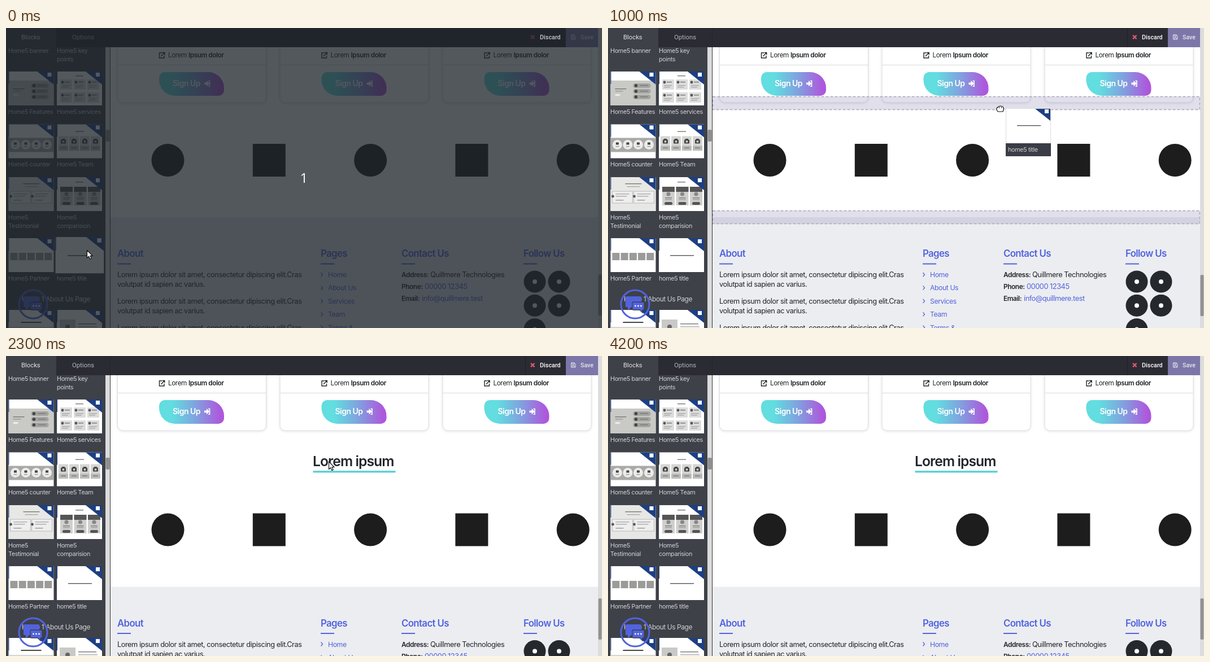
Animation of 1055 by 531 pixels, one loop 4.5 s. Source, as an HTML page:

```html
<!DOCTYPE html>
<html lang="en">
<head>
<meta charset="utf-8">
<title>Website builder: dragging a title block</title>
<style>
  html, body { margin: 0; width: 100%; height: 100%; overflow: hidden; background: #fff; }
  svg { display: block; width: 1055px; height: 531px; }
  text { font-family: Inter, "Open Sans", sans-serif; letter-spacing: -.037em; white-space: pre; }
  .ui { font-family: Roboto, sans-serif; letter-spacing: 0; }
</style>
</head>
<body>
<svg id="stage" viewBox="0 0 1055 531"></svg>
<script>
const INK = '#212529', BLUE = '#5163df', NAVY = '#1d3f82', SIDE = '#3e4148', LABEL = '#cfd0d3';
const BODY = 12.8, SMALL = 10.9;

const rect = (x, y, w, h, fill, extra = '') =>
  `<rect x="${x}" y="${y}" width="${w}" height="${h}" fill="${fill}" ${extra}/>`;
const circle = (x, y, r, fill, extra = '') =>
  `<circle cx="${x}" cy="${y}" r="${r}" fill="${fill}" ${extra}/>`;
const path = (d, fill, extra = '') => `<path d="${d}" fill="${fill}" ${extra}/>`;
const line = (d, color, width = 1, extra = '') =>
  path(d, 'none', `stroke="${color}" stroke-width="${width}" ${extra}`);
const text = (x, y, size, str, fill = INK, extra = '') =>
  `<text x="${x}" y="${y}" font-size="${size}" fill="${fill}" ${extra}>${str}</text>`;
const group = (x, y, body, extra = '') => `<g transform="translate(${x} ${y})" ${extra}>${body}</g>`;
const each = (list, fn) => list.map(fn).join('');
const range = n => [...Array(n).keys()];
const semi = 'font-weight="600"';

// Page content
function card(x) {
  return group(x, 0,
    rect(.5, -20, 263, 152, '#fff', 'rx="9" stroke="#dadbe0" filter="url(#soft)"') +
    line('M1 65.5H263', '#dadbdd') +
    line('M79 44H74.5V53H83V49M77.5 50L83.5 43.7M79.5 43.5H83.7V47.5', INK, 1.4) +
    text(90, 52, 11.8, `Lorem <tspan ${semi}>Ipsum dolor</tspan>`) +
    path('M84 78H161A28 28 0 0 1 189 106V110A10 10 0 0 1 179 120H102A28 28 0 0 1 74 92V88A10 10 0 0 1 84 78Z', 'url(#candy)') +
    text(98, 103, 14, 'Sign Up', '#fff', semi) +
    path('M154 96.5H158V93L163.5 98.3 158 103.5V100.3H154Z', '#fff') +
    line('M161 93.5H163.5V103.2H161', '#fff', 1.6));
}

function footer() {
  const lorem = y =>
    text(197, y, BODY, 'Lorem ipsum dolor sit amet, consectetur dipiscing elit.Cras') +
    text(197, y + 17, BODY, 'volutpat id sapien ac varius.');
  const heads = [[197, 'About'], [557, 'Pages'], [700, 'Contact Us'], [916, 'Follow Us']];
  const links = ['Home', 'About Us', 'Services', 'Team', 'Terms &amp;'];
  const facts = [
    ['Address:', 751, 'Quillmere Technologies', INK],
    ['Phone:', 741, '00000 12345', BLUE],
    ['Email:', 736, 'info@quillmere.test', BLUE]];
  return rect(185, 335, 863, 300, '#ecedf0') +
    each(heads, ([x, s]) => text(x, 405, 16.8, s, BLUE, semi) + rect(x, 416.5, 24, 2, BLUE)) +
    each([441, 488, 535], lorem) +
    each(links, (s, i) => {
      const y = 441 + i * 23.4;
      return line(`M557.5 ${y - 8}l3 3.5-3 3.5`, BLUE, 1.3) + text(570, y, 12.3, s, BLUE);
    }) +
    each(facts, ([name, x, value, color], i) =>
      text(700, 441 + i * 21, 11.9, name, INK, semi) + text(x, 441 + i * 21, BODY, value, color)) +
    each(range(5), i => {
      const x = 936 + i % 2 * 43, y = 449 + (i >> 1) * 42.3;
      return circle(x, y, 19.5, '#25292d') + circle(x, y, 4, '#fff');
    });
}

const partners = each(range(5), i => {
  const x = 286.5 + i * 179.3;
  return i % 2 ? rect(x - 29, 205, 58, 58, '#1d1d1d') : circle(x, 234, 29, '#1d1d1d');
});

const zone = y => rect(185.5, y, 862, 23, '#7c78aa', 'fill-opacity="var(--pulse)"') +
  rect(185.5, y, 862, 23, 'none', 'stroke="#aaa8b8" stroke-width="1.4" stroke-dasharray="5 3"');

// Sidebar thumbnails, each 80 by 60
const stripe = (x, y, w, c = '#777') => rect(x, y, w, 1.4, c);
const thumbs = {
  features: rect(0, 16, 80, 44, '#c9c9c5') + stripe(8, 30, 20) + stripe(8, 34, 14, '#999') +
    rect(8, 40, 9, 3, '#eee', 'rx="1.5"') +
    each([21, 31, 41], y => rect(40, y, 31, 8, '#a3a3a1', 'rx="4"') +
      circle(45, y + 4, 2.8, '#444') + stripe(52, y + 3, 14)),
  services: stripe(33, 7, 14) + each(range(6), i => {
    const x = 6 + i % 3 * 24, y = 14 + (i / 3 | 0) * 23;
    return rect(x, y, 21, 18, '#dcdcdc') + circle(x + 4, y + 5, 2.4, '#555') +
      stripe(x + 8, y + 4, 9) + stripe(x + 3, y + 10, 14, '#aaa') + stripe(x + 3, y + 13, 11, '#aaa');
  }),
  counter: rect(0, 24, 80, 25, '#a9a9a7') + each([12, 30.5, 49, 68], x =>
    circle(x, 36, 8.5, '#ececea') + rect(x - 2.5, 32, 5, 4, '#444') + stripe(x - 3, 38.5, 6, '#999')),
  team: stripe(33, 12, 15) + each(range(4), i => {
    const x = 3 + i * 19;
    return rect(x, 21, 17, 26, '#d5d5d3') + rect(x, 38, 17, 8, '#b9b9b7') +
      rect(x + 4, 27, 9, 7, '#444', 'rx="1"') + rect(x + 6, 25.5, 5, 3, '#444') +
      circle(x + 8.5, 30.5, 2, '#ccc') + stripe(x + 4, 41, 9);
  }),
  testimonial: rect(0, 0, 80, 60, '#e7e7e5') + stripe(26, 11, 29) + stripe(29, 16, 23, '#aaa') +
    each([3, 41], x => rect(x, 25, 36, 21, '#eee', 'stroke="#bbb"') + circle(x + 1, 34, 2.4, '#555') +
      stripe(x + 6, 29, 24, '#aaa') + stripe(x + 6, 33, 20, '#aaa') + stripe(x + 6, 40, 14, '#999')),
  comparision: stripe(33, 8, 14) + each(range(3), i => {
    const x = 6 + i * 24.5;
    return rect(x, 17, 22, 33, '#cfcfcd') + rect(x, 17, 22, 9, '#555') + circle(x + 11, 30, 3.6, '#888') +
      stripe(x + 5, 36, 12) + stripe(x + 5, 39, 12, '#999') + rect(x + 4, 44, 14, 5, '#555', 'rx="2.5"');
  }),
  partner: each(range(5), i => rect(3 + i * 15.2, 26, 13, 13, '#9b9b99')),
  title: stripe(20, 30, 42, '#555'),
  banner: rect(0, 30, 80, 30, '#d5d5d3') + rect(22, 21, 36, 2, '#444'),
  story: rect(5, 17, 28, 40, '#c9c9c7') + circle(19, 30, 4, '#666') + stripe(38, 24, 32) +
    stripe(38, 29, 34, '#aaa'),
};
const thumb = kind => rect(0, 0, 80, 60, '#fff') + thumbs[kind] + rect(0, 0, 1, 22, NAVY) +
  path('M51 0H80V23Z', NAVY) + rect(69, 2, 7, 7, '#fff');

function sidebar() {
  const kinds = Object.keys(thumbs), tops = [77, 170.5, 264, 372, 499];
  const labels = [
    [4, 44, 'Home5 banner'], [90, 44, 'Home5 key'], [90, 59, 'points'],
    [4, 152, 'Home5 Features'], [90, 152, 'Home5 services'],
    [4, 245, 'Home5 counter'], [90, 245, 'Home5 Team'],
    [4, 339, 'Home5'], [4, 354, 'Testimonial'], [90, 339, 'Home5'], [90, 354, 'comparision'],
    [4, 447, 'Home5 Partner'], [90, 447, 'home5 title']];
  return rect(0, 34, 176, 497, SIDE) + rect(176, 34, 8, 497, '#dcdcdc') + rect(184, 34, 1, 497, '#333') +
    rect(176.5, 180, 7, 21, '#8e8e8e', 'rx="2"') +
    each(kinds, (kind, i) => group(i % 2 ? 90 : 4.5, tops[i >> 1], thumb(kind), `id="${kind}"`)) +
    each(labels, ([x, y, s]) => text(x, y, SMALL, s, LABEL)) +
    text(149, 484, 12, 'Home 1 About Us Page', LABEL, 'text-anchor="end"') +
    circle(48, 489, 25, 'none', `stroke="${BLUE}" stroke-width="3"`) +
    path('M33 475H57Q59 475 59 477V492Q59 494 57 494H41L35 500V494H33Q31 494 31 492V477Q31 475 33 475Z', BLUE) +
    path('M45 485H62Q64 485 64 487V497Q64 499 62 499H61V504L56 499H45Q43 499 43 497V487Q43 485 45 485Z',
      BLUE, `stroke="${SIDE}" stroke-width="1.3"`) +
    each([48.5, 53.5, 58.5], x => circle(x, 492, 1.4, '#fff'));
}

const header = rect(0, 0, 1048, 34, '#2b2b34') + rect(0, 0, 89, 34, SIDE) + rect(184, 0, 1, 34, '#24242c') +
  rect(919, 0, 1, 34, '#202028') + rect(991, 0, 57, 34, '#7c77a8') +
  text(27, 19.5, 11.3, 'Blocks', '#e4e4e6', 'class="ui"') +
  text(117, 19.5, 11.3, 'Options', '#b5b6bb', 'class="ui"') +
  line('M929 12.8l6.5 6.5m0-6.5l-6.5 6.5', '#d9566d', 2.4) +
  line('M1000.5 12H1006L1008 14V20H1000.5ZM1002.5 12V15H1005.5V12M1002.5 20V17H1006V20', '#e6e5ef') +
  text(1017, 19.5, 10.6, 'Save', '#e6e5ef', 'class="ui" font-weight="500"');

// Pointers
const outline = 'stroke="#111" stroke-width="1.2" stroke-linejoin="round"';
const pointers = {
  arrow: path('M.5 .5V14L3.6 11.2 5.8 16 8.2 15 6 10.2H10Z', '#fff', outline),
  open: path('M-4 7L-7 2Q-7-1-4 1L-5-4Q-4-6-2.5-4L-2-6Q-.5-8 1-6L2-6.5Q4-7 4-4L5-4Q7-4 6.5-1L5 7Z', '#fff', outline) +
    line('M-2.3-4L-1 0M1-6V-.5M4-4L3 0', '#111'),
  fist: path('M-4 5L-6 2V-1Q-5-3-4-2Q-3-5-1-4Q1-6 2.5-4Q5-5 5.5-2Q7-1 6 2L5 5Z', '#fff', outline) +
    line('M-1-3V-1M2.5-3V-1', '#111'),
};

const stage = document.getElementById('stage');
stage.innerHTML = `<defs>
    <linearGradient id="candy"><stop offset=".2" stop-color="#62dde0"/>
      <stop offset=".58" stop-color="#829fdf"/><stop offset=".95" stop-color="#ae57dc"/></linearGradient>
    <filter id="soft"><feDropShadow dx="0" dy="1" stdDeviation="2" flood-opacity=".12"/></filter>
  </defs>` +
  rect(0, 0, 1055, 531, '#fff') +
  each([197, 484.5, 772.5], card) +
  group(0, 0, partners + footer(), 'id="flow"') +
  group(0, 0, text(543, 194.5, 24.6, 'Lorem ipsum', INK, semi) + rect(543.5, 203, 146, 3.5, '#62d0d8'), 'id="added"') +
  group(0, 0, zone(121.5) + zone(323.5), 'id="zones"') +
  sidebar() + header +
  rect(1048, 0, 7, 531, '#dcdcdc') + rect(1048.5, 436, 6, 73, '#929292', 'id="scroll" rx="2"') +
  group(0, 0, thumb('title') + rect(0, 60, 80, 3, '#fff') + rect(.5, .5, 79, 62, 'none', 'stroke="#ddd"') +
    rect(0, 62, 80, 23, '#3a3d45') + text(4, 77, SMALL, 'home5 title', LABEL), 'id="dragged"') +
  group(0, 0, rect(0, 0, 1055, 531, '#1e242b', 'opacity=".76"') +
    text(527, 274, 24, '1', '#fff', 'text-anchor="middle" style="font-family:\'Open Sans\',sans-serif"'), 'id="veil"') +
  text(945, 19.5, 10.8, 'Discard', '#fff', 'class="ui" font-weight="500" id="discard"') +
  each(Object.keys(pointers), k => group(0, 0, pointers[k], `id="${k}"`));

// Keys: [time, x, y]
const pointerKeys = [
  [0, 143, 393], [299, 143, 393], [300, 147, 399], [400, 147, 399], [500, 215, 350], [700, 470, 215],
  [1000, 694, 143], [1500, 588, 136], [1600, 588, 134], [2000, 588, 134], [2200, 621, 178],
  [2400, 521, 195], [2600, 521, 195], [3000, 672, 187], [3200, 672, 187], [3500, 380, 300],
  [3800, 122, 333], [3900, 122, 333], [4100, 41, 7]];
const dragKeys = [[500, 212, 350], [700, 474, 214], [1000, 704, 142], [1500, 584.5, 135]];

function along(keys, t) {
  const i = keys.findIndex(k => k[0] > t);
  if (i < 0) return keys.at(-1).slice(1);
  if (i === 0) return keys[0].slice(1);
  const [a, b] = [keys[i - 1], keys[i]], p = (t - a[0]) / (b[0] - a[0]);
  return [a[1] + (b[1] - a[1]) * p, a[2] + (b[2] - a[2]) * p];
}

const el = id => document.getElementById(id);
const show = (id, on) => el(id).style.display = on ? '' : 'none';
const move = (id, x, y, scale = 1) =>
  el(id).setAttribute('transform', `translate(${x} ${y}) scale(${scale})`);

function draw(now) {
  const t = Math.floor(now % 4500 / 100) * 100;
  const dragging = t >= 500 && t < 1600, dropped = t >= 1600;
  show('veil', t < 300);
  el('discard').setAttribute('opacity', t < 300 ? .75 : 1);
  show('zones', dragging);
  stage.style.setProperty('--pulse', .24 + .09 * Math.sin(Math.PI * (t - 1000) / 1000) ** 2);
  show('added', dropped);
  move('flow', 0, dropped ? 73.5 : 0);
  el('scroll').setAttribute('y', dropped ? 429 : dragging ? 437 : 436);

  if (t < 500) move('title', 87.6, 370, 1.07);
  else move('title', 90, 372);
  show('dragged', dragging);
  move('dragged', ...along(dragKeys, t));

  const kind = t >= 4200 ? '' : dragging ? 'fist' : t >= 300 && t < 500 ? 'open' : 'arrow';
  for (const k in pointers) {
    show(k, k === kind);
    move(k, ...along(pointerKeys, t));
  }
}

function tick() {
  draw(performance.now());
  requestAnimationFrame(tick);
}
tick();
</script>
</body>
</html>
```
